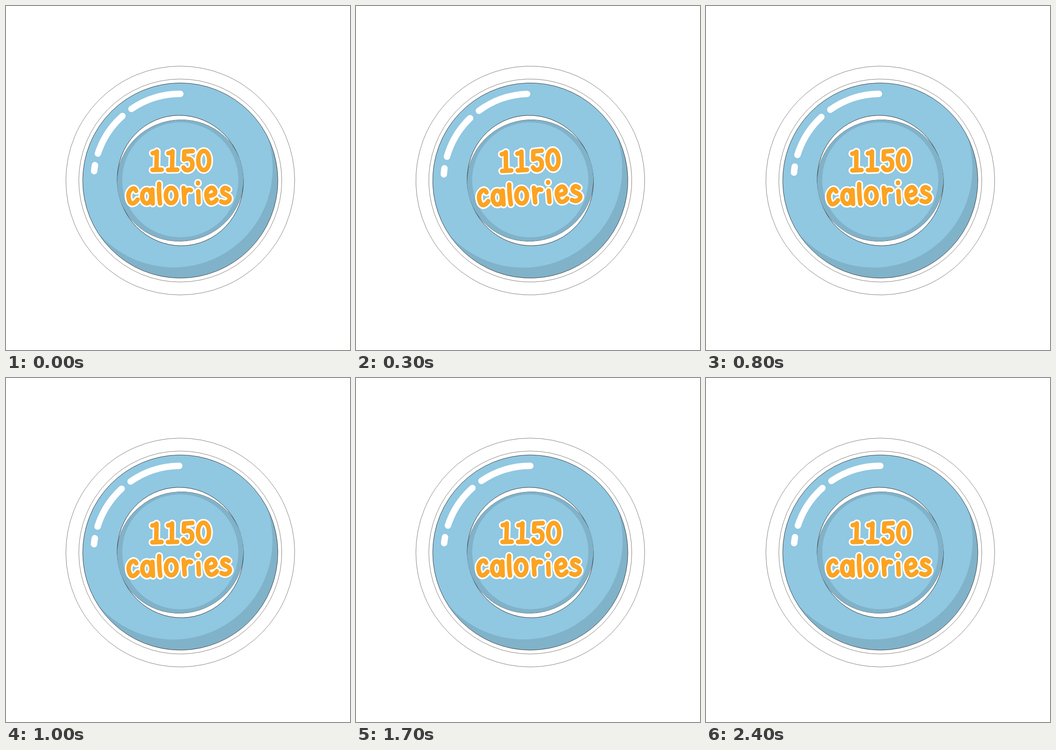
Animation of 748 by 748 pixels, one loop 2.5 s. Source, as an HTML page:

```html
<!DOCTYPE html>
<html lang="en">
<head>
<meta charset="utf-8">
<title>1150 calories</title>
<style>
  html, body { margin: 0; width: 100%; height: 100%; overflow: hidden; background: #fff; }
  svg { display: block; width: 100%; height: 100%; }
  .edge { fill: none; stroke: #000; stroke-width: .7; }
  .hairline { fill: none; stroke: #000; stroke-width: .5; }
  .base { fill: #80b2c9; }
  .lit { fill: #90c7e1; }
  .shine { fill: none; stroke: #fff; stroke-width: 14; stroke-linecap: round; }
  .letters { fill: none; stroke-linecap: round; stroke-linejoin: round; }
  .halo { stroke: #fff; stroke-width: 16.6; }
  .ink { stroke: #fca321; stroke-width: 9.8; }
</style>
</head>
<body>
<svg viewBox="0 0 748 748" role="img" aria-label="1150 calories">
  <defs>
    <clipPath id="plateClip"><circle cx="379" cy="379.5" r="212"/></clipPath>
    <ellipse id="hole" cx="379" cy="379.5" rx="137" ry="142" transform="rotate(-12 379 379.5)"/>
    <ellipse id="disc" cx="379" cy="379.5" rx="137.5" ry="131.7" transform="rotate(-12 379 379.5)"/>
    <clipPath id="holeClip"><use href="#hole"/></clipPath>
    <g id="lettering">
      <g transform="translate(0 1)">
        <path d="M319 319 Q326 318 328 315 L327 355 M318.5 355.5 L338.5 355"/>
        <path d="M353 319 Q360 318 362 315 L361 355 M352.5 355.5 L372.5 355"/>
        <path d="M406 314.5 L388 315.5 L387 333 Q401 327 405 339 Q407 354 396 356 Q389 357 386 350"/>
        <ellipse cx="430" cy="335" rx="12" ry="20.8"/>
      </g>
      <path d="M283 402 Q279 393 272 399 Q264 407 267 419 Q270 432 278 428.5 Q283 426 286 421"/>
      <ellipse cx="306" cy="414" rx="10" ry="15"/>
      <path d="M318 399 L319 429.5"/>
      <path d="M333 386.5 Q332 410 335 429.5"/>
      <ellipse cx="359" cy="412" rx="11.5" ry="16.5"/>
      <path d="M386 395.5 L388 427.5 M388 410 Q393 396 402 400.5"/>
      <path d="M418 403 L419 427.5 M417.5 384.5 L417.5 385.5"/>
      <path d="M437 413 Q456 413 455 403 Q451 392 443 396.5 Q434 402 436 414 Q439 430.5 449 428 Q455 426 458 421"/>
      <path d="M484 399 Q476 392 471 399 Q468 406 478 410 Q490 415 485 423 Q478 431 468 425"/>
    </g>
  </defs>
  <g id="badge">
    <circle class="hairline" cx="379" cy="379.5" r="248.8"/>
    <circle class="hairline" cx="379" cy="379.5" r="220.7"/>
    <circle class="base" cx="379" cy="379.5" r="212"/>
    <circle class="lit" cx="364.3" cy="353" r="215.5" clip-path="url(#plateClip)"/>
    <circle class="edge" cx="379" cy="379.5" r="212.2"/>
    <g id="shines"></g>

    <use href="#hole" fill="#fff"/>
    <use href="#hole" class="edge"/>
    <g clip-path="url(#holeClip)"><use href="#disc" class="edge"/></g>
    <use href="#disc" class="base"/>
    <ellipse class="lit" cx="379" cy="378" rx="126.3" ry="125"/>

    <use class="letters halo" href="#lettering"/>
    <use class="letters ink" href="#lettering"/>
  </g>
</svg>
<script>
  const LOOP = 2500, STEP = 100;
  const CX = 379, CY = 379.5, SHINE_RADIUS = 188.5;
  const badge = document.getElementById('badge');

  // Tilt over time: [ms, degrees]
  const tilt = [[0, 0], [300, -2.1], [500, -1.05], [800, -0.95], [1300, -0.3], [1700, 0], [LOOP, 0]];

  // Highlight arcs, in degrees clockwise from the top
  const shines = [[-34.3, 0], [-71.9, -41.9], [-83.8, -79.8]];

  function onCircle(degrees) {
    const a = degrees * Math.PI / 180;
    return `${CX + SHINE_RADIUS * Math.sin(a)} ${CY - SHINE_RADIUS * Math.cos(a)}`;
  }

  document.getElementById('shines').innerHTML = shines.map(([from, to]) =>
    `<path class="shine" d="M${onCircle(from)} A${SHINE_RADIUS} ${SHINE_RADIUS} 0 0 1 ${onCircle(to)}"/>`
  ).join('');

  function valueAt(keys, t) {
    const i = keys.findIndex(([time]) => time > t);
    const [t0, v0] = keys[i - 1], [t1, v1] = keys[i];
    return v0 + (v1 - v0) * (t - t0) / (t1 - t0);
  }

  function draw(t) {
    const held = Math.floor((t % LOOP) / STEP) * STEP;
    badge.setAttribute('transform', `rotate(${valueAt(tilt, held)} ${CX} ${CY})`);
  }

  const start = performance.now();
  function tick() {
    draw(performance.now() - start);
    requestAnimationFrame(tick);
  }
  tick();
</script>
</body>
</html>
```
